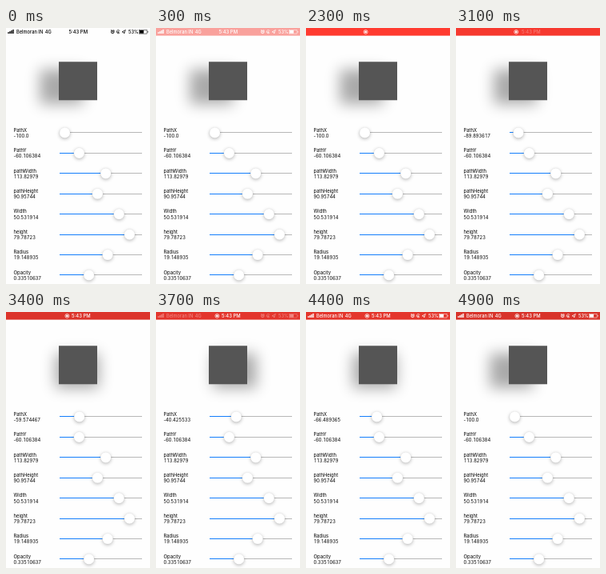
Animation, 180 px wide and 320 px high, one loop 5 s. Source, as an HTML page with a canvas:

```html
<!DOCTYPE html>
<html lang="en">
<head>
<meta charset="utf-8">
<title>Shadow path sliders</title>
<style>
  html, body { margin: 0; width: 100%; height: 100%; overflow: hidden; background: #fefefe; }
  canvas { display: block; width: 180px; height: 320px; }
</style>
</head>
<body>
<canvas id="stage"></canvas>
<script>
const LOOP = 5000, STEP = 100, W = 180, H = 320;
const PT = 0.48; // stage pixels per layout point
const FONT = 'Inter, "Liberation Sans", sans-serif';
const canvas = document.getElementById('stage');
const ctx = canvas.getContext('2d');
const scale = Math.max(1, window.devicePixelRatio || 1);
canvas.width = W * scale;
canvas.height = H * scale;

// Keys are [time, value] pairs, joined linearly.
function tween(t, keys) {
  if (t <= keys[0][0]) return keys[0][1];
  for (let i = 1; i < keys.length; i++) {
    const [t0, a] = keys[i - 1], [t1, b] = keys[i];
    if (t <= t1) return a + (b - a) * (t - t0) / (t1 - t0);
  }
  return keys[keys.length - 1][1];
}

const pathXStep = [[3000, 0], [3400, 76], [3700, 112], [4100, 101], [4900, 0]];
const barAlpha = [[0, 0], [300, 0.47], [600, 1]];
const barGlow = [[600, 0.7], [1200, 0], [1800, 1], [3000, 1], [3400, 0.1],
                 [4100, 0.5], [4900, 0]];
const sideAlpha = [[700, 1], [1100, 0], [3500, 0], [4000, 1]];
const clockAlpha = [[600, 1], [900, 0], [3000, 0], [3300, 1]];
const iconAlpha = [[600, 0], [900, 1]];
const iconX = [[3000, 74.6], [3300, 76.4]];

function pathX(t) {
  const share = Math.fround(Math.round(tween(t, pathXStep)) / 376);
  return Math.fround(200 * share) - 100;
}

function text(str, x, y, size, weight = 400, align = 'left') {
  ctx.font = `${weight} ${size}px ${FONT}`;
  ctx.textAlign = align;
  ctx.fillText(str, x, y);
}

// Every digit takes the width of a zero, as in tabular figures.
function figures(str, x, y, size) {
  for (const ch of str) {
    ctx.font = `400 ${size}px ${FONT}`;
    const advance = ctx.measureText(/\d/.test(ch) ? '0' : ch).width;
    text(ch, x + advance / 2, y, size, 400, 'center');
    x += advance;
  }
}

function circle(x, y, r) {
  ctx.beginPath();
  ctx.arc(x, y, r, 0, Math.PI * 2);
}

function line(...points) {
  ctx.beginPath();
  points.forEach(([x, y]) => ctx.lineTo(x, y));
}

function shadow(color, blur, x, y) {
  ctx.shadowColor = color;
  ctx.shadowBlur = blur * scale;
  ctx.shadowOffsetX = x * scale;
  ctx.shadowOffsetY = y * scale;
}

function drawBox(px) {
  const x = 66, y = 42.25, away = 500;
  ctx.save();
  shadow('rgba(0,0,0,0.335)', 2 * 19.15 * PT, away, 0);
  ctx.fillStyle = '#000';
  ctx.fillRect(x + (px + 50.53) * PT - away, y + (79.79 - 60.11) * PT,
               113.83 * PT, 90.96 * PT);
  ctx.restore();
  ctx.fillStyle = '#555';
  ctx.fillRect(x, y, 48, 48);
}

function drawSlider(row, name, label, share) {
  const y = 130.95 + row * 25.42, left = 67, right = 170;
  const thumb = 73.5 + 90 * share, trackY = Math.floor(y);
  ctx.fillStyle = '#000';
  text(name, 9.5, y - 1.2, 5.9);
  figures(label, 9.5, y + 5.9, 5.8);
  ctx.fillStyle = '#b7b7b7';
  ctx.fillRect(left, trackY, right - left, 1);
  ctx.fillStyle = '#147efb';
  ctx.fillRect(left, trackY, thumb - left, 1);
  ctx.save();
  shadow('rgba(0,0,0,0.28)', 4, 0, 1.3);
  ctx.fillStyle = '#fff';
  circle(thumb, y, 6.6);
  ctx.fill();
  ctx.restore();
  ctx.strokeStyle = 'rgba(0,0,0,0.13)';
  ctx.lineWidth = 0.3;
  ctx.stroke();
}

function drawSideStatus() {
  for (let i = 0; i < 4; i++) {
    const h = 1.8 + i * 1.1;
    ctx.fillRect(2.3 + i * 2, 7 - h, 1.4, h);
  }
  text('Belmoran IN', 13, 7, 5.7, 500);
  text('4G', 48.8, 7, 5.7, 500);

  ctx.lineWidth = 0.9;
  circle(133.3, 4.9, 1.8);
  ctx.stroke();
  line([133.3, 3.8], [133.3, 5], [134.1, 5]);
  ctx.stroke();
  line([131, 3.3], [132.1, 2.3]);
  ctx.stroke();
  line([134.5, 2.3], [135.6, 3.3]);
  ctx.stroke();

  ctx.lineWidth = 0.7;
  ctx.beginPath();
  ctx.arc(140.3, 4.7, 2.1, 0.5, Math.PI * 1.85);
  ctx.stroke();
  ctx.fillRect(139.4, 4.4, 1.8, 1.4);

  line([145, 5], [149.4, 2.4], [147.7, 7], [147.2, 5]);
  ctx.closePath();
  ctx.stroke();

  text('53%', 153, 7, 5.7, 500);
  ctx.lineWidth = 0.5;
  ctx.strokeRect(166.7, 2.5, 9.4, 4.6);
  ctx.fillRect(167.1, 2.9, 5, 3.8);
  ctx.fillRect(176.8, 4, 0.7, 1.6);
}

function drawStatus(t) {
  const recording = t >= 100;
  const glow = tween(t, barGlow);
  const mix = (a, b) => Math.round(a + (b - a) * glow);
  ctx.globalAlpha = tween(t, barAlpha);
  ctx.fillStyle = `rgb(${mix(216, 255)},${mix(51, 59)},${mix(42, 48)})`;
  ctx.fillRect(0, 0, W, 9.6);

  ctx.fillStyle = ctx.strokeStyle = recording ? '#fff' : '#000';
  ctx.globalAlpha = tween(t, sideAlpha);
  drawSideStatus();
  ctx.globalAlpha = tween(t, clockAlpha);
  text('5:43 PM', t < 2000 ? 90.2 : 93.8, 7, 5.9, 500, 'center');

  ctx.globalAlpha = tween(t, iconAlpha);
  const x = tween(t, iconX);
  ctx.lineWidth = 0.7;
  circle(x, 4.9, 2.5);
  ctx.stroke();
  circle(x, 4.9, 1.4);
  ctx.fill();
  ctx.globalAlpha = 1;
}

function draw(t) {
  const px = pathX(t);
  const pathXLabel = px === -100 ? '-100.0' : String(Number(px.toPrecision(8)));
  const signed = v => (v + 100) / 200;
  const rows = [
    ['PathX', pathXLabel, signed(px)],
    ['PathY', '-60.106384', signed(-60.106384)],
    ['pathWidth', '113.82979', 113.82979 / 200],
    ['pathHeight', '90.95744', 90.95744 / 200],
    ['Width', '50.531914', signed(50.531914)],
    ['height', '79.78723', signed(79.78723)],
    ['Radius', '19.148935', signed(19.148935)],
    ['Opacity', '0.33510637', 0.33510637],
  ];
  ctx.setTransform(scale, 0, 0, scale, 0, 0);
  ctx.fillStyle = '#fefefe';
  ctx.fillRect(0, 0, W, H);
  drawBox(px);
  rows.forEach((row, i) => drawSlider(i, ...row));
  drawStatus(t);
}

const start = performance.now();
function frame() {
  const t = (performance.now() - start) % LOOP;
  draw(Math.floor(t / STEP) * STEP);
  requestAnimationFrame(frame);
}
frame();
</script>
</body>
</html>
```
